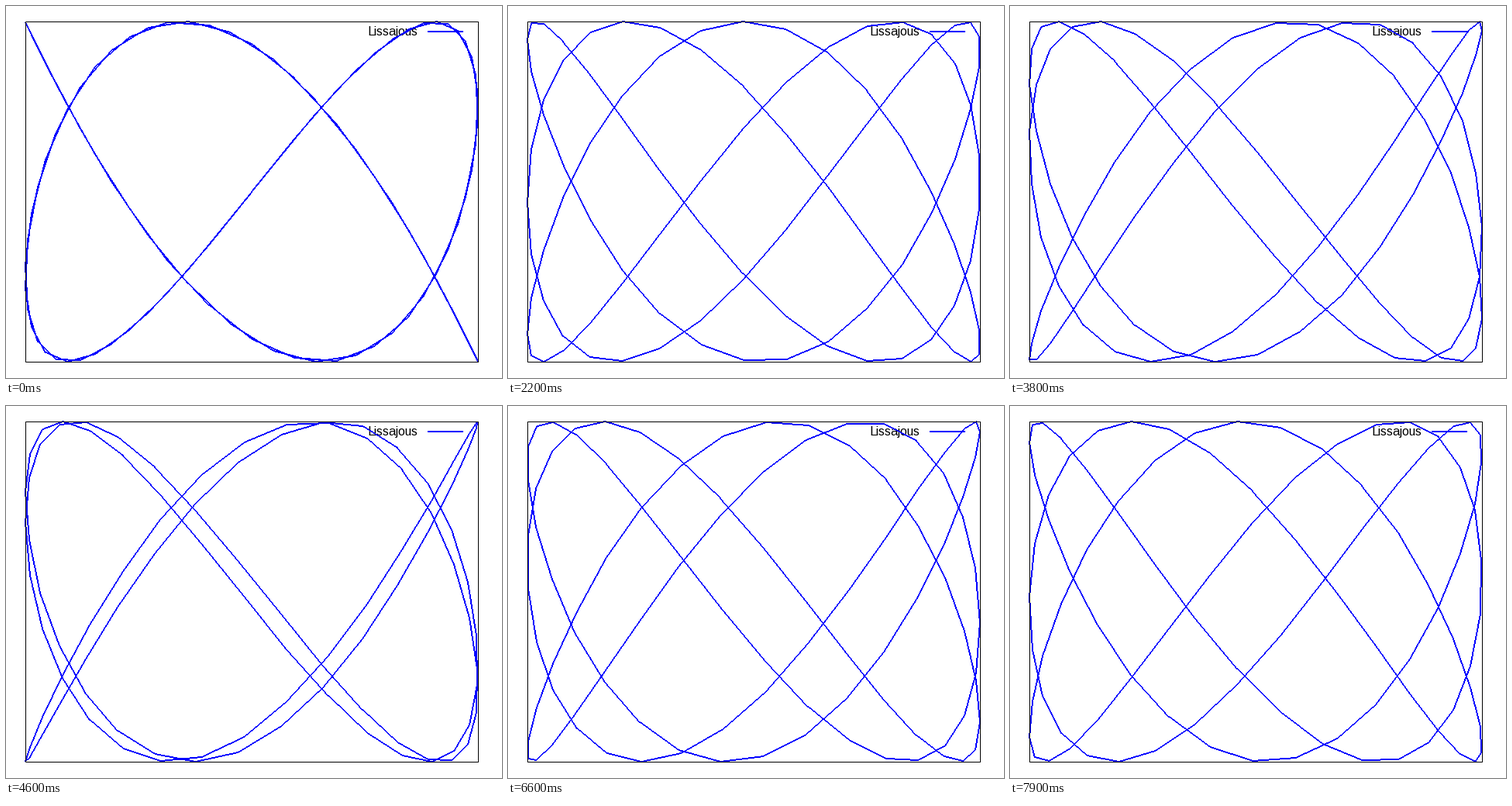
A matplotlib script for the animation above (8 s loop, 640 px wide and 480 px high).

```python
import numpy as np
import matplotlib.pyplot as plt
from matplotlib.animation import FuncAnimation
from matplotlib.patches import PathPatch, Rectangle
from matplotlib.path import Path

W, H, DPI = 640, 480, 100
LEFT, TOP, RIGHT, BOTTOM = 25, 20, 609, 459
FRAMES, INTERVAL = 80, 100
PHASE_STEP = 2 * np.pi / 100
BLUE = "#0000ff"

plt.rcParams["text.hinting"] = "force_autohint"
plt.rcParams["text.hinting_factor"] = 1

t = np.linspace(-np.pi, np.pi, 100)


def px(n):
    return n * 72 / DPI


def lissajous(phase):
    """Curve vertices on whole pixels, y pointing down."""
    x = np.sin(3 * t + phase)
    y = np.sin(5 * t + 2 * phase)
    col = LEFT + np.floor((RIGHT - LEFT) * (x + 1) / 2 + 0.5)
    row = BOTTOM - np.floor((BOTTOM - TOP) * (y + 1) / 2 + 0.5)
    return np.column_stack([col, row])


def segment_cells(p, q):
    """Pixel-aligned cells of one hard-edged segment, two pixels thick."""
    d = q - p
    steps = int(max(np.abs(d).max(), 1))
    at = np.floor(p + np.arange(steps + 1)[:, None] * d / steps + 0.5)
    flat = abs(d[0]) >= abs(d[1])
    lo = at - ([0, 1] if flat else [1, 0])
    size = [1, 2] if flat else [2, 1]
    corners = np.array([[0, 0], [1, 0], [1, 1], [0, 1]]) * size
    return lo[:, None, :] + corners


def stroke_path(pts):
    cells = [segment_cells(p, q) for p, q in zip(pts[:-1], pts[1:])]
    path = Path.make_compound_path_from_polys(np.concatenate(cells))
    path.should_simplify = False
    return path


def add_stroke(pts, zorder):
    return ax.add_patch(PathPatch(stroke_path(pts), fc=BLUE, ec="none", lw=0,
                                  snap=False, zorder=zorder))


fig = plt.figure(figsize=(W / DPI, H / DPI), dpi=DPI, facecolor="white")
ax = fig.add_axes([0, 0, 1, 1])
ax.set_xlim(0, W)
ax.set_ylim(H, 0)
ax.axis("off")

ax.text(466, 38, "Lissajous", family="Liberation Sans", size=px(16),
        color="black", ha="left", va="baseline", zorder=1)
add_stroke(np.array([[544, 33], [589, 33]]), 2)
curve = add_stroke(lissajous(0), 3)
ax.add_patch(Rectangle((LEFT + 0.5, TOP + 0.5), RIGHT - LEFT, BOTTOM - TOP,
                       fill=False, ec="black", lw=px(1), snap=False, zorder=4))


def update(i):
    curve.set_path(stroke_path(lissajous(i * PHASE_STEP)))
    return [curve]


anim = FuncAnimation(fig, update, frames=FRAMES, interval=INTERVAL,
                     repeat=True, repeat_delay=0, blit=False)
plt.show()
```
